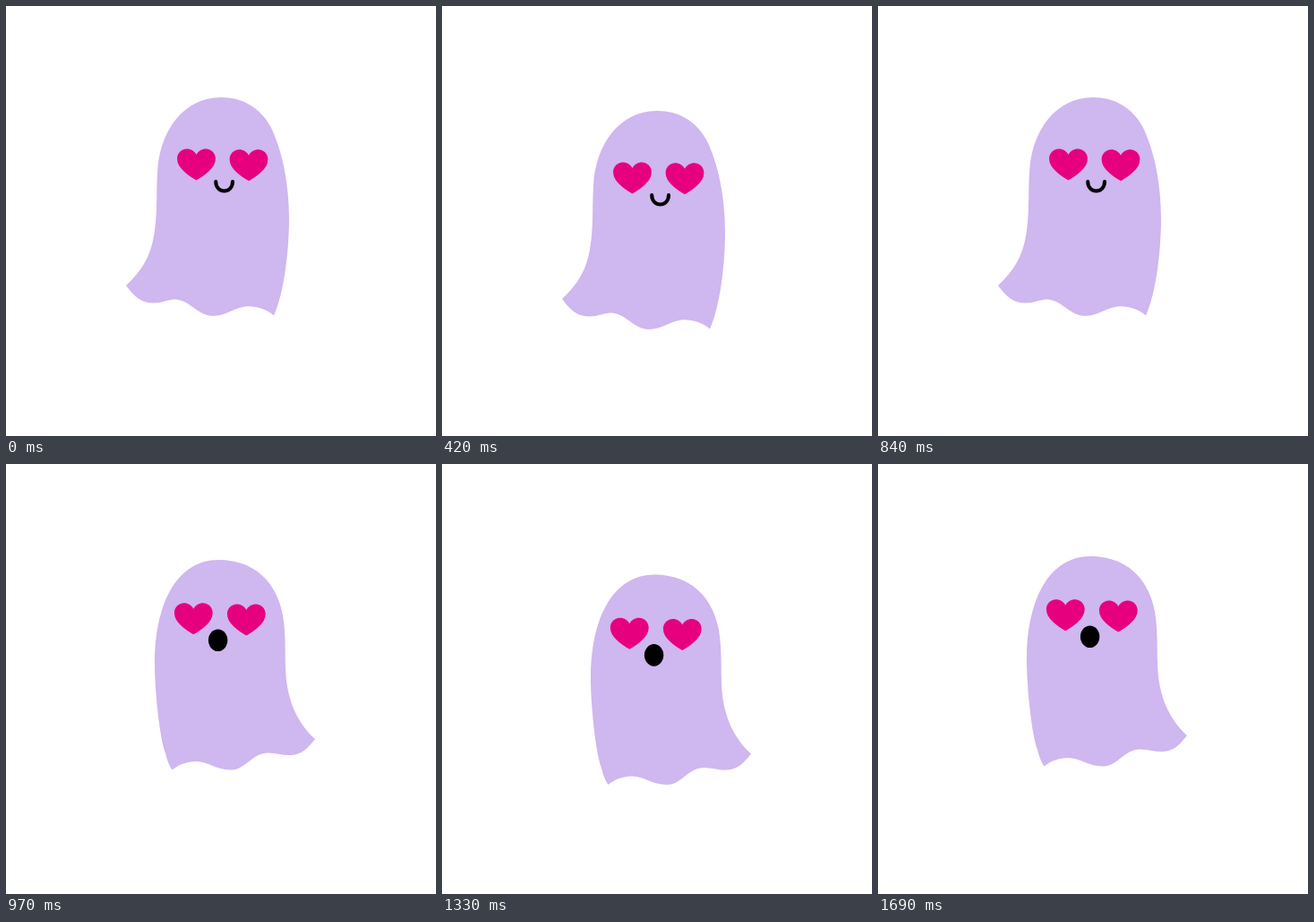
An HTML page for the animation above (1.72 s loop, 480 by 480 pixels).

```html
<!DOCTYPE html>
<html lang="en">
<head>
<meta charset="utf-8">
<title>Ghost</title>
<style>
  html, body { margin: 0; width: 100%; height: 100%; overflow: hidden; background: #fff; }
  svg { display: block; width: 100%; height: 100%; }
</style>
</head>
<body>
<svg viewBox="0 0 480 480">
  <defs>
    <path id="heart" fill="#e6007e" d="M0 -28.5C2 -32.5 6 -35 10.6 -35C17 -35 21.4 -30 21.4 -24C21.4 -14 10 -6 0 0C-10 -6 -21.4 -14 -21.4 -24C-21.4 -30 -17 -35 -10.6 -35C-6 -35 -2 -32.5 0 -28.5Z"/>
  </defs>
  <g id="smiling">
    <path fill="#cfb7ef" d="M134 312C160 288 167 266 168 222C168.5 212 168 205 169 186C171 140 198 102 240 102C264 102 283 113 295 134C309 162 316 200 316 237C316 275 310 322 299 345.5C290 338 278 334.5 267 335.5C254 337 246 346 231 346C212 345 206 328 188 327.5C181 327.5 174 332 163 331.5C150 331 143 324 134 312Z"/>
    <use href="#heart" x="212.5" y="194.5"/>
    <use href="#heart" x="271" y="195.3"/>
    <path d="M234.2 196C234.2 210 253 210 253 196" fill="none" stroke="#000" stroke-width="4" stroke-linecap="round"/>
  </g>
  <g id="gasping">
    <path fill="#cfb7ef" d="M185.5 337.5C193 331.5 202 328 212 328C226 328 234 337.5 251 337.5C268 337.5 274 318.5 293 318.5C301 318.5 309 321.5 318 321C331 320 336 314 345 303C323 283 312.5 255 312 222C311.5 205 312 198 311 182C309 134 282 103 237 103C193 103 166 148 166 220C166 245 171 300 178 319C180 327 182 332 185.5 337.5Z"/>
    <use href="#heart" x="209.3" y="186.3"/>
    <use href="#heart" x="268.3" y="187.5"/>
    <ellipse cx="236.6" cy="192.8" rx="10.7" ry="12.3"/>
  </g>
</svg>
<script>
  const LOOP = 1720, STEP = 30, SWAP = 870, RESUME = 910;
  const smiling = document.getElementById('smiling');
  const gasping = document.getElementById('gasping');

  const snap = (t, from) => from + Math.floor((t - from) / STEP) * STEP;

  // Linear drop from start to peak, then linear rise until end.
  const bob = (t, start, peak, end, depth) =>
    depth * Math.max(0, Math.min((t - start) / (peak - start), (end - t) / (end - peak)));

  function draw(ms) {
    const t = ms % LOOP;
    const first = t < SWAP;
    const y = first
      ? bob(snap(t, 0), 0, 450, 840, 16)
      : bob(snap(t, RESUME), RESUME, 1270, 1690, 24);
    smiling.style.display = first ? '' : 'none';
    gasping.style.display = first ? 'none' : '';
    (first ? smiling : gasping).setAttribute('transform', `translate(0 ${y.toFixed(2)})`);
  }

  const begin = performance.now();
  function tick() {
    draw(performance.now() - begin);
    requestAnimationFrame(tick);
  }
  tick();
</script>
</body>
</html>
```
